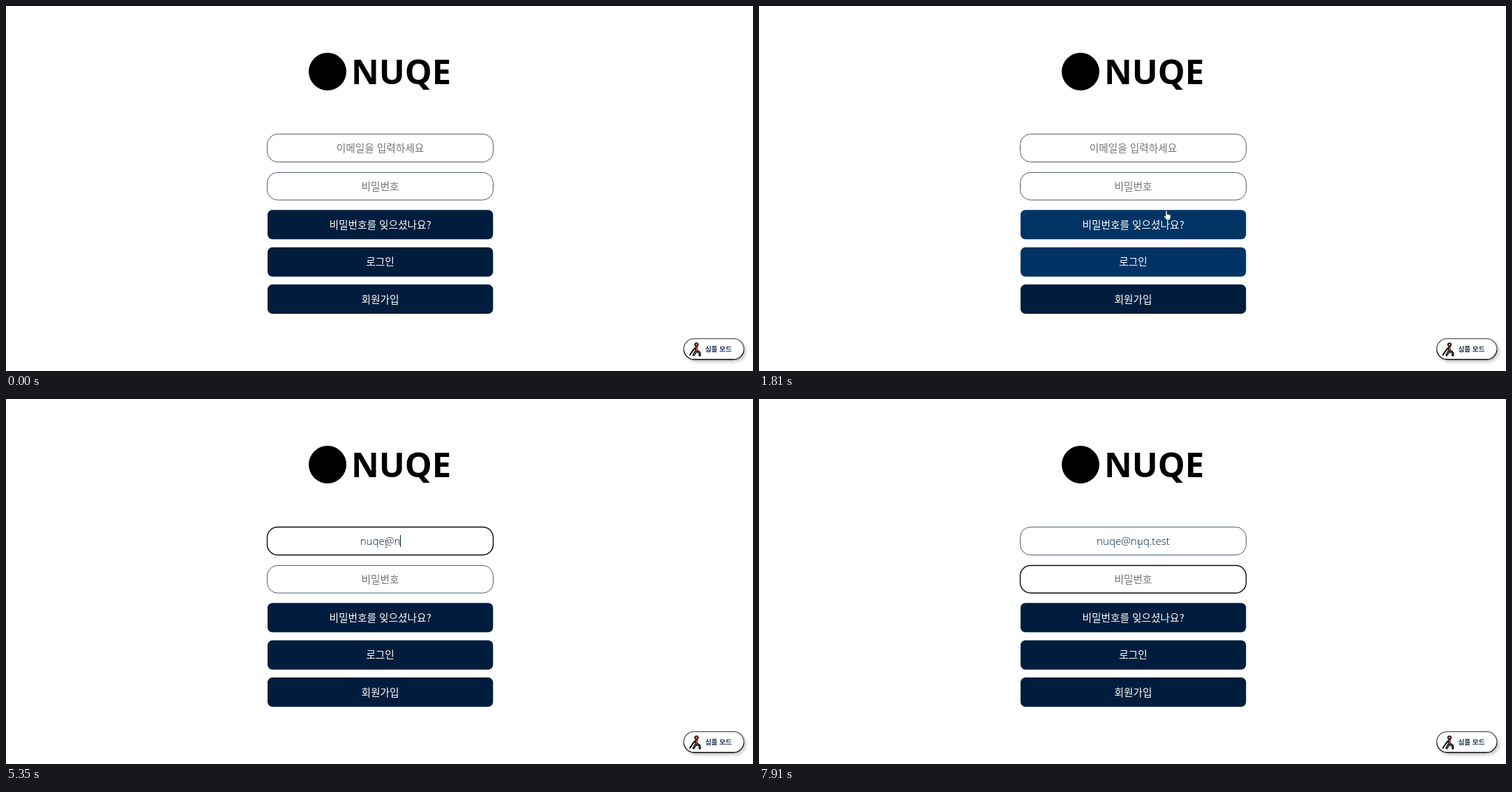
Write an HTML page that moves like this. It is 1071 px wide and 523 px high and loops after 8000 ms.

```html
<!DOCTYPE html>
<html lang="ko">
<head>
<meta charset="utf-8">
<title>로그인</title>
<style>
  html, body { margin: 0; width: 100%; height: 100%; overflow: hidden; background: #fff; }
  svg { display: block; width: 1071px; height: 523px; }
  text { font: 400 14.7px "Noto Sans CJK KR", "Noto Sans CJK", "Noto Sans", sans-serif; text-anchor: middle; }
  .field { fill: #fff; stroke: #4d5b76; stroke-width: 1; }
  .field.focus { stroke: #0a0a0a; stroke-width: 1.4; }
  .hint { fill: #757575; font-weight: 300; }
  .typed { fill: #001d3d; font: 300 15.2px "Open Sans", sans-serif; }
  .label { fill: #fff; font-weight: 500; }
  .brand { font: 700 49px "Open Sans", sans-serif; text-anchor: start; }
  .mode { font-size: 9.6px; font-weight: 700; fill: #1c2f52; }
</style>
</head>
<body>
<svg viewBox="0 0 1071 523">
  <defs>
    <filter id="soft" x="-20%" y="-40%" width="150%" height="200%"><feGaussianBlur stdDeviation="2.5"/></filter>
    <linearGradient id="bevel" x2="0" y2="1">
      <stop offset=".4" stop-color="#555"/><stop offset=".7" stop-color="#000"/>
    </linearGradient>
  </defs>

  <circle cx="461" cy="94" r="27"/>
  <text class="brand" x="495" y="111.5">NUQE</text>

  <rect id="email" class="field" x="374.5" y="183.5" width="324" height="40" rx="15"/>
  <rect id="password" class="field" x="374.5" y="238.5" width="324" height="39.500" rx="15"/>
  <text id="emailHint" class="hint" x="536.5" y="209.3">이메일을 입력하세요</text>
  <text class="hint" x="536.5" y="263.7">비밀번호</text>
  <text id="typed" class="typed" x="536.5" y="209"></text>
  <rect id="caret" width="1" height="17" fill="#001d3d"/>

  <g id="buttons"></g>

  <rect x="974" y="479" width="87" height="31" rx="15.5" opacity=".22" filter="url(#soft)"/>
  <rect x="971.7" y="476.7" width="86.300" height="29.800" rx="14.900" fill="#fff" stroke="url(#bevel)" stroke-width="1.3"/>
  <g fill="none" stroke="#000" stroke-linecap="round" stroke-linejoin="round">
    <path d="M990 489l-.5 6M989.500 494l-3.500 6M990 494l4 2.500.8 3.800" stroke-width="3.400"/>
    <path d="M988 490l-3 3.500-4.500 6.500" stroke-width="2"/>
    <path d="M990.300 489.500l-.6 4.500" stroke="#d9482b" stroke-width="1.800"/>
    <path d="M988.800 495.500l-2.600 4.300M991 495l2.600 1.800.7 3.200" stroke="#8593a8" stroke-width="1"/>
    <circle cx="990" cy="485.300" r="2.400" fill="#ef6a3a" stroke-width="1.300"/>
  </g>
  <text class="mode" x="1021.500" y="495.300">심플 모드</text>

  <g id="pointer">
    <path id="arrow" d="M0 0v12l2.800-2.500 1.800 4 1.800-.8-1.800-3.900h3.700z" fill="#fff" stroke="#000" stroke-width=".7"/>
    <path id="hand" d="M-1 .8q1-1.500 2 0v4.400l4.300.9q1.200.4 1 1.700l-.7 4.200q-.3 1.600-1.700 1.600H1.200Q.300 13.500-.3 12.700L-3.500 8.700q0-1.500 1.500-1L-1 8.500z" fill="#fff" stroke="#001" stroke-width=".5"/>
    <path id="beam" d="M-2-5h1.500l.5.500.5-.5H2M0-4.500v9M-2 5h1.500l.5-.5.5.5H2" fill="none" stroke="#555" stroke-width=".8"/>
  </g>
</svg>
<script>
const LOOP = 8000, CENTER = 536.5, MOVE_START = 1120, MOVE_STEP = 69;
const byId = id => document.getElementById(id);
const address = "nuqe@nuq.test";
const keyTimes = [3950, 4150, 4340, 4560, 5090, 5350, 5490, 5620, 5750, 6290, 6490, 6690, 6960];
const path = [[1120, 1062, 512], [1603, 648, 357], [1810, 584, 293], [1879, 556, 222], [1948, 541, 208], [3580, 541, 208], [3600, 545, 208]];

// Each button: label, top, and hover start, peak, leave and end times.
const buttons = [
  ["비밀번호를 잊으셨나요?", 292.3, [1650, 1820, 1870, 2750]],
  ["로그인", 345.8, [1550, 1700, 1650, 2620]],
  ["회원가입", 399.1, null]
].map(([label, y, hover]) => {
  byId("buttons").insertAdjacentHTML("beforeend",
    `<rect x="375" y="${y}" width="323.3" height="41.9" rx="7"/>
     <text class="label" x="${CENTER}" y="${y + 26.6}">${label}</text>`);
  return { rect: byId("buttons").lastElementChild.previousElementSibling, hover };
});

const clamp = v => Math.max(0, Math.min(1, v));
const smooth = v => v * v * (3 - 2 * v);

function hoverAmount(times, t) {
  if (!times) return 0;
  const [enter, peak, leave, end] = times;
  return clamp((t - enter) / (peak - enter)) * (1 - smooth(clamp((t - leave) / (end - leave))));
}

// The pointer is redrawn at a fixed interval, so it moves in small jumps.
function pointerAt(t) {
  const held = t - (t - MOVE_START) % MOVE_STEP;
  const i = path.findIndex(p => p[0] > held);
  if (i < 0) return path.at(-1).slice(1);
  const [t0, x0, y0] = path[i - 1], [t1, x1, y1] = path[i];
  const k = (held - t0) / (t1 - t0);
  return [x0 + (x1 - x0) * k, y0 + (y1 - y0) * k];
}

const show = (id, on) => byId(id).style.display = on ? "" : "none";

function draw(t) {
  for (const { rect, hover } of buttons) {
    const k = hoverAmount(hover, t);
    rect.setAttribute("fill", `rgb(0 ${29 + 24 * k} ${61 + 41 * k})`);
  }

  const count = keyTimes.filter(key => key <= t).length;
  const onEmail = t >= 3350 && t < 7380, onPassword = t >= 7380;
  byId("email").classList.toggle("focus", onEmail);
  byId("password").classList.toggle("focus", onPassword);
  byId("typed").textContent = address.slice(0, count);
  show("emailHint", !count);

  const half = count && onEmail ? byId("typed").getComputedTextLength() / 2 : 0;
  byId("caret").setAttribute("x", Math.round(CENTER + half - .5));
  byId("caret").setAttribute("y", onPassword ? 249 : 195);
  show("caret", onEmail || onPassword && t < 7910);

  show("pointer", t >= MOVE_START);
  if (t >= MOVE_START) {
    const [x, y] = pointerAt(t);
    const inField = x > 375 && x < 698 && (y > 238 && y < 278 || y < 224);
    const onButton = x < 698 && (y > 292 && y < 334 || y > 346 && y < 388) ||
      x > 971 && x < 1058 && y > 476 && y < 507;
    show("beam", inField);
    show("hand", onButton);
    show("arrow", !inField && !onButton);
    byId("pointer").setAttribute("transform", `translate(${x} ${y})`);
  }
}

function tick() {
  draw(performance.now() % LOOP);
  requestAnimationFrame(tick);
}
tick();
</script>
</body>
</html>
```
